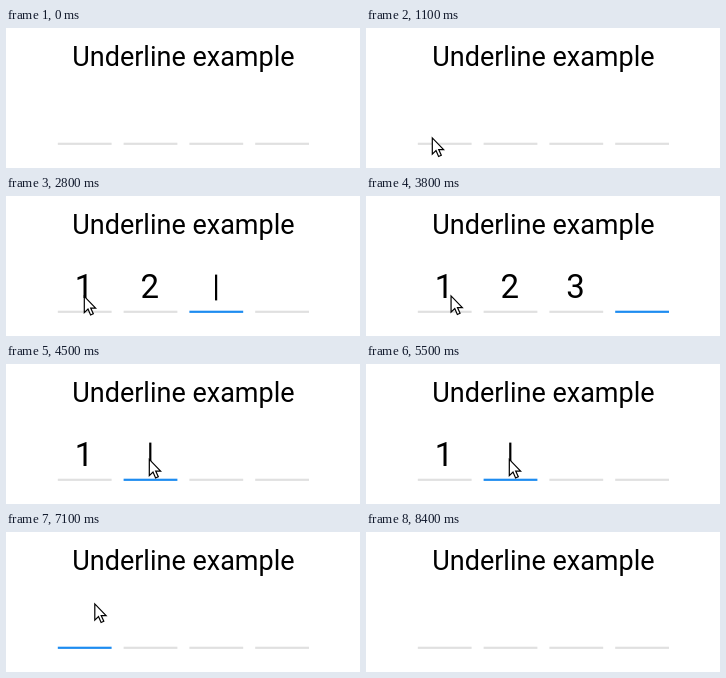
These frames come from a looping animation (354 px wide and 140 px high, 8800 ms). An HTML page:

```html
<!DOCTYPE html>
<html lang="en">
<head>
<meta charset="utf-8">
<title>Underline example</title>
<style>
  html, body { margin: 0; width: 100%; height: 100%; overflow: hidden; background: #fff; }
  svg { display: block; }
  text { font-family: Roboto, sans-serif; text-anchor: middle; }
</style>
</head>
<body>
<svg id="stage" width="354" height="140" viewBox="0 0 354 140">
  <text x="177.4" y="38" font-size="27">Underline example</text>
  <g id="cells"></g>
  <path id="pointer" d="M.3.4V16.6L4 13.1 6.6 19 9.3 17.8 6.7 12.1H11.6Z"
        fill="#fff" stroke="#000" stroke-width="1.2"/>
</svg>
<script>
const LOOP = 8800, STEP = 100, BLINK = 500;

// The user enters 1, 2, 3 ... so the number of digits is the whole state; -1 means no focus.
const states = [{ start: 0, count: -1 }];
const enter = (start, interval, ...counts) =>
  counts.forEach((count, i) => states.push({ start: start + i * interval, count }));

enter(1600, 0, 0);
enter(2500, 300, 1, 2, 3);
enter(4500, 0, 1);
enter(5600, 200, 0, 2, 3, 2, 1, 0);
enter(7700, 0, -1);

const entry = { x: 20, y: 142 };
const moves = [
  { start: 300, duration: 500, x: 54, y: 119 },
  { start: 1000, duration: 200, x: 78, y: 100 },
  { start: 3700, duration: 500, x: 143, y: 95 },
  { start: 6900, duration: 400, x: 34, y: 48 },
  { start: 8100, duration: 300, x: 32, y: -25 }
];

const ease = k => k * k * (3 - 2 * k);
const clamp = k => Math.max(0, Math.min(1, k));

function pointerAt(t) {
  return moves.reduce((from, to) => {
    const k = ease(clamp((t - to.start) / to.duration));
    return { x: from.x + (to.x - from.x) * k, y: from.y + (to.y - from.y) * k };
  }, entry);
}

const add = (parent, tag, attrs) => {
  const node = document.createElementNS("http://www.w3.org/2000/svg", tag);
  for (const key in attrs) node.setAttribute(key, attrs[key]);
  return parent.appendChild(node);
};

const group = document.getElementById("cells");
const pointer = document.getElementById("pointer");
const cells = [0, 1, 2, 3].map(i => {
  const x = 51.8 + i * 65.8;
  const digit = add(group, "text", { x: x + 26.2, y: 102, "font-size": 33 });
  digit.textContent = i + 1;
  return {
    digit,
    line: add(group, "rect", { x, y: 114.7, width: 53.8, height: 2.2 }),
    caret: add(group, "rect", { x: x + 25.6, y: 78.6, width: 2.2, height: 25.8 })
  };
});

const show = (node, visible) => node.setAttribute("opacity", visible ? 1 : 0);

function draw(t) {
  const { start, count } = states.findLast(s => s.start <= t);
  const caretOn = Math.floor((t - start) / BLINK) % 2 === 0;
  cells.forEach(({ digit, line, caret }, i) => {
    line.setAttribute("fill", i === count ? "#1e8cf0" : "#e0e0e0");
    show(caret, i === count && caretOn);
    show(digit, i < count);
  });
  const { x, y } = pointerAt(t);
  pointer.setAttribute("transform", `translate(${x} ${y})`);
}

function tick() {
  draw(Math.floor(performance.now() % LOOP / STEP) * STEP);
  requestAnimationFrame(tick);
}
tick();
</script>
</body>
</html>
```
